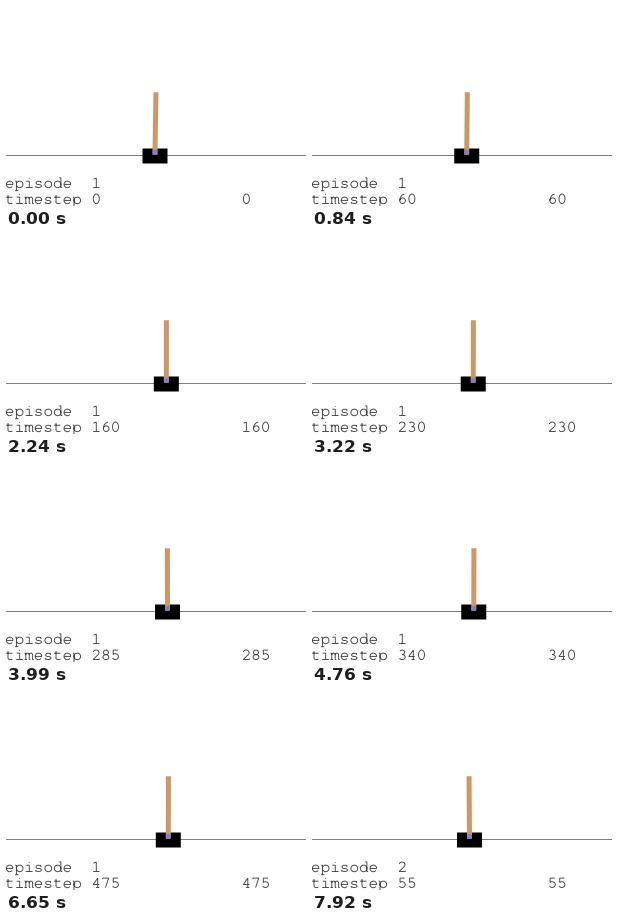
Animation of 300 by 200 pixels, one loop 7990 ms. Source, as a matplotlib script:

```python
import math

import numpy as np
import matplotlib.pyplot as plt
from matplotlib.animation import FuncAnimation
from matplotlib.patches import Circle, PathPatch, Polygon, Rectangle
from matplotlib.path import Path

W, H, DPI = 300, 200, 100
PX = 72 / DPI                  # one pixel in points
TICK, LOOP = 10, 7990          # ms
STEP = 70                      # ms between pictures, 5 timesteps each
LAST, RESTART = 99, 7150       # final picture of episode 1, start of episode 2

CART_W, CART_H = 25, 15
POLE_W, POLE_L = 5, 62.5
TRACK_Y, AXLE_Y = 150, 146.25
ADVANCE = 9.6                  # width of one typewriter character


def line(*xy):
    return np.reshape(xy, (-1, 2)).astype(float)


def arc(cx, cy, rx, ry, start=0, end=360):
    a = np.radians(np.linspace(start, end, 25))
    return np.column_stack([cx + rx * np.cos(a), cy + ry * np.sin(a)])


# Thin slab-serif pen strokes, in pixels above the baseline.
LETTERS = {
    "e": [arc(4.6, 3.4, 3.3, 3.3, 0, 320), line(1.3, 3.4, 7.9, 3.4)],
    "p": [line(0.4, 6.6, 1.7, 6.6, 1.7, -2.9), line(0.4, -2.9, 3.7, -2.9),
          arc(5, 3.4, 3.3, 3.3)],
    "i": [line(2, 6.6, 5, 6.6, 5, 0.3), line(1.5, 0.3, 8.3, 0.3),
          line(4.5, 9.4, 5.3, 9.4)],
    "s": [arc(4.7, 4.9, 2.6, 1.7, 30, 270), arc(4.7, 1.8, 2.8, 1.5, 90, -150),
          line(7.1, 6.4, 7.1, 4.9), line(1.8, 0.2, 1.8, 1.8)],
    "o": [arc(4.8, 3.4, 3.4, 3.3)],
    "d": [arc(4.5, 3.4, 3.3, 3.3), line(6.2, 10, 7.8, 10, 7.8, 0.3, 9.1, 0.3)],
    "t": [line(2.9, 8.8, 2.9, 1.8), arc(5.4, 1.8, 2.5, 1.6, 180, 320),
          line(1, 6.6, 7.4, 6.6)],
    "m": [line(0.2, 6.6, 1.5, 6.6, 1.5, 0.3), line(0.2, 0.3, 2.6, 0.3),
          arc(3.2, 4.9, 1.7, 1.8, 180, 0), line(4.9, 4.9, 4.9, 0.3, 6, 0.3),
          arc(6.6, 4.9, 1.7, 1.8, 180, 0), line(8.3, 4.9, 8.3, 0.3, 9.4, 0.3)],
}
DIGITS = {
    "0": [arc(4.8, 5, 3, 4.8)],
    "1": [line(2, 8.6, 4.8, 9.7, 4.8, 0.3), line(1.7, 0.3, 7.9, 0.3)],
    "2": [arc(4.6, 7.1, 2.9, 2.7, 165, -35),
          line(7, 5.5, 1.6, 0.3, 7.8, 0.3, 7.8, 1.2)],
    "3": [arc(4.6, 7.5, 2.5, 2.3, 150, -90), arc(4.6, 2.7, 3.1, 2.5, 90, -150)],
    "4": [line(6.2, 0.3, 6.2, 9.7, 1.7, 3.3, 7.7, 3.3), line(4.4, 0.3, 7.7, 0.3)],
    "5": [line(7.2, 9.7, 2.5, 9.7, 2.5, 5.4), arc(4.6, 3.2, 3.1, 2.9, 130, -150)],
    "6": [arc(5.1, 3.1, 2.8, 2.8), arc(7.5, 3.2, 5.2, 6.5, 95, 180)],
    "7": [line(1.7, 8.6, 1.7, 9.7, 7.5, 9.7, 4.4, 0.2)],
    "8": [arc(4.8, 7.4, 2.5, 2.3), arc(4.8, 2.7, 2.9, 2.5)],
    "9": [arc(4.6, 6.9, 2.8, 2.8), arc(2.2, 6.8, 5.2, 6.5, -85, 0)],
}
GLYPHS = LETTERS | DIGITS

fig = plt.figure(figsize=(W / DPI, H / DPI), dpi=DPI, facecolor="white")
ax = fig.add_axes([0, 0, 1, 1])
ax.set_xlim(0, W)
ax.set_ylim(H, 0)
ax.axis("off")


class Label:
    """A line of typewriter text that can be retyped."""

    def __init__(self, x, y):
        self.x, self.y = x, y
        self.patch = ax.add_patch(PathPatch(Path([(x, y)]), fill=False,
                                            ec="#484848", lw=0.95 * PX,
                                            snap=False))

    def write(self, text):
        strokes = [Path((self.x + k * ADVANCE, self.y) + s * (1, -1))
                   for k, ch in enumerate(text) for s in GLYPHS.get(ch, [])]
        self.patch.set_path(Path.make_compound_path(*strokes))


ax.add_patch(Rectangle((0, TRACK_Y - 1), W, 1, fc="#808080", lw=0, zorder=1,
                       snap=False))
cart = ax.add_patch(Rectangle((0, TRACK_Y - CART_H / 2), CART_W, CART_H,
                              fc="black", lw=0, zorder=2, snap=False))
pole = ax.add_patch(Polygon([(0, 0)] * 4, closed=True, fc=(0.8, 0.6, 0.4),
                            lw=0, zorder=3, snap=False))
axle = ax.add_patch(Circle((0, AXLE_Y), POLE_W / 2, fc=(0.5, 0.5, 0.8),
                           lw=0, zorder=4))
episode = Label(-0.9, 181.8)
timestep = Label(-0.9, 197.8)
total = Label(235.6, 197.8)


def state(ms):
    """Episode, picture number, cart centre and pole angle at a time."""
    if ms < RESTART:
        n = min(ms // STEP, LAST)
        x = 161 - 12 * math.exp(-(n / 16) ** 1.5) + 0.02 * max(n - 30, 0)
        angle = (0.016 * math.exp(-(n / 19) ** 2)
                 + 0.004 * math.sin(n * 0.29) * min(n / 30, 1))
        return 1, n, x, angle
    n = (ms - RESTART) // STEP
    x = 151.6 + 5.9 * (n / 11) ** 1.2
    return 2, n, x, 0.012 - 0.02 * n / 11


def pole_corners(x, angle):
    s, c = math.sin(angle), math.cos(angle)
    half, low, high = POLE_W / 2, -POLE_W / 2, POLE_L - POLE_W / 2
    box = [(-half, low), (-half, high), (half, high), (half, low)]
    return [(x + u * c + v * s, AXLE_Y + u * s - v * c) for u, v in box]


def draw(i):
    ep, n, x, angle = state(i * TICK)
    cart.set_x(x - CART_W / 2)
    pole.set_xy(pole_corners(x, angle))
    axle.center = (x, AXLE_Y)
    episode.write(f"episode  {ep}")
    timestep.write(f"timestep {5 * n}")
    total.write(str(5 * n))
    return cart, pole, axle, episode.patch, timestep.patch, total.patch


anim = FuncAnimation(fig, draw, frames=LOOP // TICK, interval=TICK,
                     init_func=lambda: draw(0), repeat=True, repeat_delay=0)
plt.show()
```
